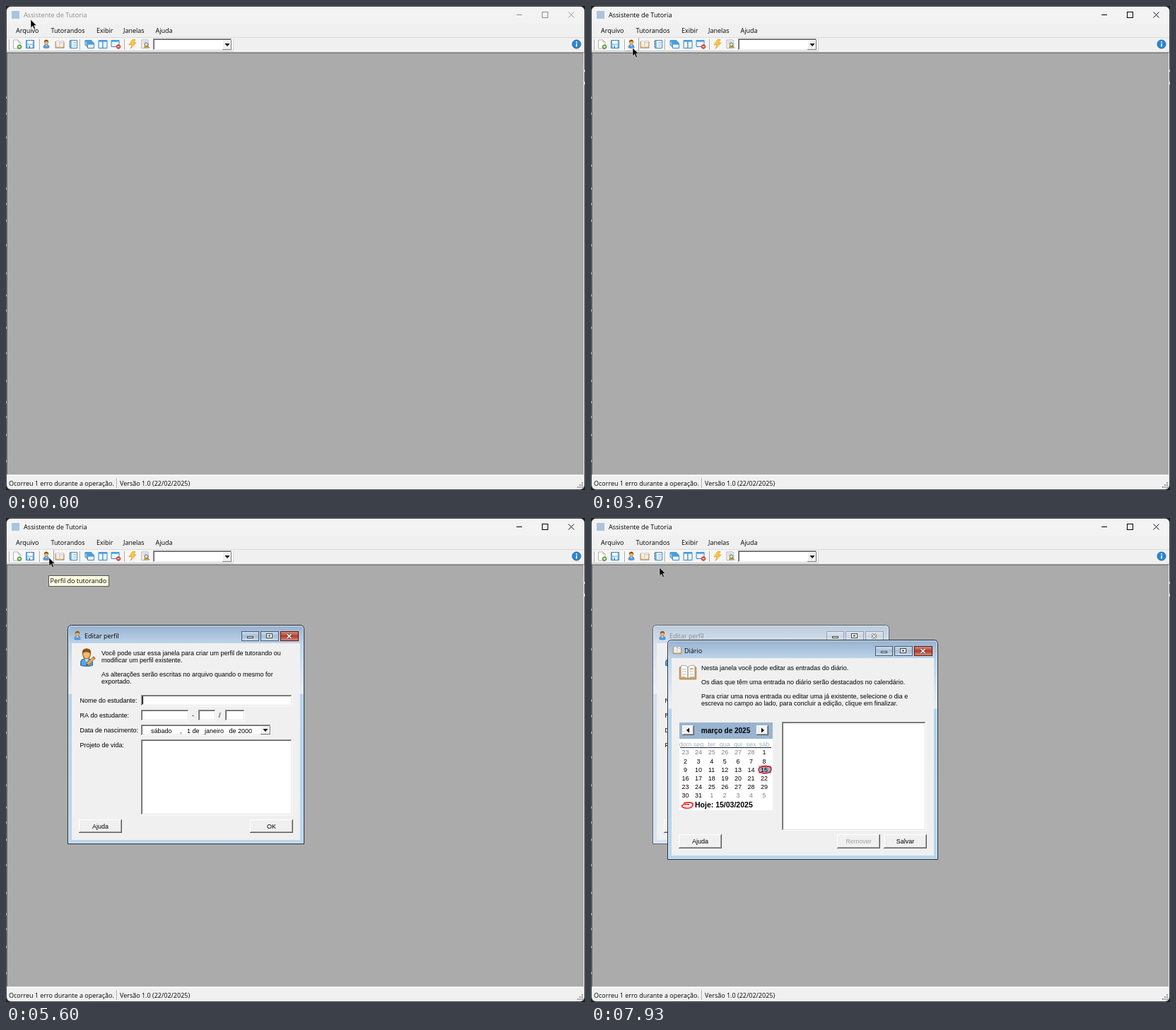
Recreate the animation shown at these times as an HTML page with a canvas. Size 819 by 684 pixels, loop 8000 ms.

```html
<!DOCTYPE html>
<html lang="pt-BR">
<head>
<meta charset="utf-8">
<style>
html, body { margin: 0; width: 100%; height: 100%; overflow: hidden; background: #222; }
canvas { display: block; }
</style>
</head>
<body>
<canvas id="stage" width="819" height="684"></canvas>
<script>
const g = document.getElementById('stage').getContext('2d');
const UI = '9px "Open Sans", sans-serif';
const TITLE = '9.2px "Open Sans", sans-serif';
const SANS = '9px "Liberation Sans", Arial, sans-serif';
const BOLD = 'bold 10px "Liberation Sans", Arial, sans-serif';
const FACE = '#f0f0f0', BLUE = '#3a86c0';

// ---- drawing helpers ----
function rect(color, x, y, w, h) {
  g.fillStyle = color;
  g.fillRect(x, y, w, h);
}
function outline(color, x, y, w, h) {
  g.strokeStyle = color;
  g.lineWidth = 1;
  g.strokeRect(x + .5, y + .5, w - 1, h - 1);
}
function rounded(color, x, y, w, h, radii) {
  g.fillStyle = color;
  g.beginPath();
  g.roundRect(x, y, w, h, radii);
  g.fill();
}
function path(d, fill, stroke, width = 1) {
  const p = new Path2D(d);
  if (fill) { g.fillStyle = fill; g.fill(p); }
  if (stroke) { g.strokeStyle = stroke; g.lineWidth = width; g.stroke(p); }
}
function text(s, x, y, font = SANS, color = '#000', align = 'left') {
  g.font = font;
  g.fillStyle = color;
  g.textAlign = align;
  g.fillText(s, x, y);
}
function bevel(x, y, w, h, topLeft, bottomRight, fill) {
  if (fill) rect(fill, x, y, w, h);
  rect(bottomRight, x, y + h - 1, w, 1);
  rect(bottomRight, x + w - 1, y, 1, h);
  rect(topLeft, x, y, w - 1, 1);
  rect(topLeft, x, y, 1, h - 1);
}
function field(x, y, w, h) {
  bevel(x, y, w, h, '#8c8c8c', '#fff', '#fff');
  bevel(x + 1, y + 1, w - 2, h - 2, '#696969', '#e3e3e3');
}
function button(label, x, y, w, h, color = '#000') {
  bevel(x, y, w, h, '#fff', '#5c5c5c', FACE);
  bevel(x + 1, y + 1, w - 2, h - 2, FACE, '#a0a0a0');
  text(label, x + w / 2, y + h / 2 + 3, SANS, color, 'center');
}
function arrow(x, y, d) {
  path(`M${x} ${y}${d}z`, '#000');
}
function at(x, y, scale, draw) {
  g.save();
  g.translate(x, y);
  g.scale(scale, scale);
  draw();
  g.restore();
}

// ---- icons, drawn around their centre ----
function person() {
  path('M-4.5 6V3.5Q-4 1 0 1Q4 1 4.5 3.5V6Q0 7.5-4.5 6z', '#5ba2dc', '#2b68a5', .6);
  path('M-1.5 1L0 3.5L1.5 1z', '#fff');
  path('M-3-3.5Q-3-6.5 0-6.5T3-3.5Q3 1 0 1.2Q-3 1-3-3.5z', '#f0b873', '#8d5a24', .6);
  path('M-3.2-2.5Q-4-6.8 0-6.8T3.2-2.5Q2-4.5-.5-4Q-2.5-4-3.2-2.5z', '#8a5218');
}
function book() {
  path('M-6.5-4H6.5V5.5H-6.5z', '#d9a860', '#a4763a', .5);
  path('M0-4Q-2.5-6.2-5.5-5V4Q-2.5 3 0 5Q2.5 3 5.5 4V-5Q2.5-6.2 0-4z', '#fffdf8', '#a59a88', .5);
  path('M0-4V5', null, '#9a958a', .8);
  path('M-4.3-2.5H-1.5M-4.3-.5H-1.5M-4.3 1.5H-1.5M1.5-.5H4.3M1.5 1.5H4.3', null, '#b4b4b4', .5);
  path('M1.5-2.7H4.3', null, '#d56342', .7);
}
function pencil() {
  path('M-5 5L-4 2L3-5L5-3L-2 4z', '#f5b041', '#8b5a17', .6);
  path('M2-4L3-5L5-3L4-2z', '#e0695a');
  path('M-5 5L-4.4 3.2L-3.1 4.4z', '#333');
}
function pane(x, y, w, h) {
  path(`M${x} ${y}h${w}v${h}h${-w}z`, '#eef7fd', BLUE, 1);
  rect('#4ea5e2', x, y, w, 2.2);
}
const toolIcons = [
  [15, () => {
    path('M-4.5-6H2L5-3V6H-4.5z', '#fff', '#a0a0a0', .8);
    path('M2-6V-3H5', '#ddd', '#a0a0a0', .6);
    path('M4 .7a3 3 0 1 0 .01 0z', '#56a727', '#397717', .5);
    path('M4 2V5.4M2.3 3.7H5.7', null, '#fff', 1);
  }],
  [34, () => {
    path('M-5.5-5.5H5.5V5.5H-5.5z', '#8cc3ec', '#3a80ba', 1);
    rect('#fff', -3.5, -5, 7, 4.5);
    rect('#f2f8fd', -3, 1, 6, 4);
    rect('#3a80ba', -1.5, 2.2, 1.5, 2.8);
  }],
  [57, () => at(0, -.3, .88, person)],
  [76, () => at(0, .2, .95, book)],
  [95, () => {
    path('M-4.5-5.5H5.5V5.5H-4.5z', '#f5fbff', BLUE, 1);
    rect('#8cc3ec', -4, -5, 2.3, 10);
    path('M-6-3.5h2.5M-6-.5h2.5M-6 2.5h2.5', null, '#777', .8);
    path('M0-2.5h4M0 0h4M0 2.5h4', null, '#7ca6c7', .8);
  }],
  [118, () => { pane(-6, -5.5, 9, 7); pane(-4, -3.5, 9, 7); pane(-2.5, -1.5, 9, 7); }],
  [137, () => { pane(-6, -5.5, 6, 11); pane(0, -5.5, 6, 11); }],
  [155, () => {
    pane(-6, -5.5, 11, 9);
    path('M4 .5a3 3 0 1 0 .01 0z', '#e0463c', '#a8271f', .5);
    path('M2.4 3.5H5.6', null, '#fff', 1.1);
  }],
  [179, () => path('M0-6.5H4L1.5-2H5L-3 6.5L-.8.7H-5z', '#ffc83a', '#d8922a', .7)],
  [197, () => {
    path('M-5-6H4V5.5H-5z', '#f7f7f7', '#a0a0a0', .8);
    path('M-3-3.5H2M-3-1.5H0', null, '#aaa', .7);
    rect('#d9a52b', -2, 2.5, 6, 2.5);
    path('M1.5-2a2.5 2.5 0 1 0 .01 0zM3.3 2.4L6 5.5', '#cfe6f6', '#555', 1);
  }]
];

// ---- main window ----
function mainWindow(active) {
  rect('#1c1c1c', 0, 0, 819, 684);
  rounded('#484848', 0, 0, 819, 684, 7);
  rounded(FACE, 1, 1, 817, 682, 6);
  rounded('#f3f3f3', 1, 1, 817, 24, [6, 6, 0, 0]);

  const ink = active ? '#000' : '#8d8d8d';
  rect('#a9c4dc', 8, 7, 11, 11);
  text('Assistente de Tutoria', 25, 16, TITLE, ink);
  rect(ink, 722, 12, 8, 1);
  outline(ink, 758, 8, 9, 9);
  path('M795.5 8.5L803.5 16.5M803.5 8.5L795.5 16.5', null, ink, .9);

  [['Arquivo', 14], ['Tutorandos', 63.5], ['Exibir', 128], ['Janelas', 166], ['Ajuda', 211.5]]
    .forEach(([label, x]) => text(label, x, 38, UI));

  rect('#dadada', 1, 44, 817, 1);
  rect('#f6f6f6', 1, 45, 321, 18);
  rect('#c4c4c4', 1, 63, 320, 1);
  rect('#d8d8d8', 321, 46, 1, 17);
  [4, 47, 104, 167].forEach(x => {
    rect('#aaa', x, 47, 1, 15);
    rect('#fff', x + 1, 47, 1, 15);
  });
  field(208, 46, 112, 17);
  bevel(306, 48, 13, 14, '#fff', '#777', FACE);
  arrow(309.5, 53, 'h7l-3.5 4');
  toolIcons.forEach(([x, draw]) => at(x, 54, 1, draw));
  path('M807 48a6 6 0 1 0 .01 0z', '#2a86d6', '#17599a', .8);
  rect('#fff', 806.2, 50.2, 1.8, 1.7);
  rect('#fff', 806.2, 53, 1.8, 4.5);

  rect('#a0a0a0', 1, 65, 817, 1);
  rect('#696969', 1, 66, 1, 596);
  rect('#ababab', 2, 66, 815, 596);
  rect('#7c7c7c', 2, 66, 815, 1);
  rect('#f6f6f6', 817, 66, 1, 596);
  rect('#e3e3e3', 1, 662, 817, 1);
  rect('#fff', 1, 663, 817, 1);
  rect('#555', 0, 66, 1, 596);
  for (let i = 0; i < 18; i++) rect('#ccc', 0, 128 + i * 30.3 + 8 * Math.sin(i * 5), 1, 3);
  rect('#ccc', 818, 90, 1, 3);
  rect('#ccc', 818, 107, 1, 4);

  text('Ocorreu 1 erro durante a operação.', 4, 677.5, UI);
  rect('#aaa', 156, 667, 1, 14);
  rect('#fff', 157, 667, 1, 14);
  text('Versão 1.0 (22/02/2025)', 161, 677.5, UI);
  for (let row = 0; row < 3; row++)
    for (let col = 0; col <= row; col++) rect('#999', 814 - col * 3, 673 + row * 3, 2, 2);
}

// ---- child windows ----
function childWindow(x, y, w, h, title, icon, active) {
  const fill = g.createLinearGradient(0, y, 0, y + h);
  const stops = active
    ? [[0, '#96b0cd'], [26, '#bcd3ea'], [97, '#e6eff8'], [98, '#b3d3ec'], [h, '#b9d6ee']]
    : [[0, '#bccbdc'], [26, '#d5e0ec'], [97, '#edf2f8'], [98, '#d3dfeb'], [h, '#d7e4f2']];
  stops.forEach(([dy, color]) => fill.addColorStop(dy / h, color));
  rounded(fill, x + .5, y + .5, w - 1, h - 1, [5, 5, 0, 0]);
  g.strokeStyle = active ? '#1f2c38' : '#56616c';
  g.lineWidth = 1;
  g.stroke();
  g.beginPath();
  g.roundRect(x + 1.5, y + 1.5, w - 3, h - 3, [4, 4, 0, 0]);
  g.strokeStyle = 'rgba(255,255,255,.55)';
  g.stroke();

  at(x + 14, y + 15, .9, icon);
  text(title, x + 24, y + 19, UI, active ? '#000' : '#888');

  const right = x + w, top = y + 9, line = active ? '#4c5d70' : '#98a3af';
  [[89, 25], [62, 26], [34, 26]].forEach(([offset, width], i) => {
    const bx = right - offset, close = i === 2 && active;
    const shade = g.createLinearGradient(0, top, 0, top + 14);
    const [a, b] = close ? ['#dd9a8c', '#b43a25'] : active ? ['#d3e1ef', '#a5bed8'] : ['#e2e9f1', '#ccd7e3'];
    shade.addColorStop(0, a);
    shade.addColorStop(.5, b);
    shade.addColorStop(1, a);
    rect(shade, bx, top, width, 14);
    outline(close ? '#5a1b14' : line, bx, top, width, 14);
    const cx = bx + 12.5, cy = top + 7;
    if (i === 0) {
      rect('#444', cx - 4.5, cy, 9, 3);
      rect('#fff', cx - 3.5, cy + 1, 7, 1);
    } else if (i === 1) {
      rect('#444', cx - 4.5, cy - 4, 9, 7);
      rect('#fff', cx - 3.5, cy - 3, 7, 5);
      rect('#444', cx - 1.5, cy - 1.5, 3, 2);
    } else {
      const cross = `M${cx - 3} ${cy - 3}l6 6m0-6l-6 6`;
      path(cross, null, '#444', 3);
      path(cross, null, '#fff', 1.6);
    }
  });
  rect(FACE, x + 6, y + 26, w - 12, h - 32);
}

function profileWindow(active, caret) {
  childWindow(87, 151, 335, 310, 'Editar perfil', person, active);
  at(114, 197, 1.85, person);
  at(120, 202, 1.25, pencil);
  [
    ['Você pode usar essa janela para criar um perfil de tutorando ou', 135, 193.5],
    ['modificar um perfil existente.', 135, 204],
    ['As alterações serão escritas no arquivo quando o mesmo for', 135, 223.5],
    ['exportado.', 135, 234],
    ['Nome do estudante:', 104.5, 261],
    ['RA do estudante:', 104.5, 282],
    ['Data de nascimento:', 104.5, 303],
    ['Projeto de vida:', 104.5, 324],
    ['-', 263, 282],
    ['/', 301, 282]
  ].forEach(line => text(...line));
  field(191, 250, 214, 16);
  field(191, 271, 68, 16);
  field(272, 271, 25, 16);
  field(310, 271, 28, 16);
  field(191, 292, 184, 16);
  [['sábado', 205], [',', 246], ['1 de', 256], ['janeiro', 281], ['de 2000', 315.5]]
    .forEach(([s, x]) => text(s, x, 303.5));
  bevel(360, 294, 14, 12, '#fff', '#777', FACE);
  arrow(363.5, 298, 'h7l-3.5 4');
  field(191, 313, 214, 107);
  button('Ajuda', 103, 426, 61, 19);
  button('OK', 345, 426, 61, 19);
  if (caret) rect('#000', 193, 252, 1, 11);
}

function calendar() {
  rect('#fff', 125, 289, 132, 124);
  rect('#99b4d1', 125, 289, 132, 23);
  button('', 129, 293, 17, 14);
  button('', 234, 293, 17, 14);
  arrow(139, 296.5, 'v7l-4-3.5');
  arrow(241, 296.5, 'v7l4-3.5');
  text('março de 2025', 190.5, 304, BOLD, '#000', 'center');
  const column = i => 133.5 + i * 18.6;
  'dom seg ter qua qui sex sáb'.split(' ')
    .forEach((day, i) => text(day, column(i), 323, SANS, '#99b4d1', 'center'));
  rect('#222', 126, 324, 129, 1);
  rect('#99b4d1', 237, 350, 18, 11);
  for (let i = 0; i < 42; i++) {
    const date = new Date(2025, 1, 23 + i);
    const color = date.getMonth() === 2 ? '#000' : '#808080';
    text(date.getDate(), column(i % 7), 334.3 + Math.floor(i / 7) * 12.2, SANS, color, 'center');
  }
  path('M241 351Q256 349 255 356Q253 361 245 361Q236 360 237 355Q239 350 251 351', null, '#f00', 1.4);
  path('M131 403Q145 400 144 406Q142 411 134 410Q127 409 129 406Q132 404 139 405', null, '#f00', 1.4);
  text('Hoje: 15/03/2025', 147, 409, BOLD.replace('10', '10.5'));
}

function diaryWindow() {
  childWindow(108, 172, 383, 311, 'Diário', book, true);
  at(137, 218, 1.8, book);
  [
    ['Nesta janela você pode editar as entradas do diário.', 214.5],
    ['Os dias que têm uma entrada no diário serão destacados no calendário.', 234.5],
    ['Para criar uma nova entrada ou editar uma já existente, selecione o dia e', 255],
    ['escreva no campo ao lado, para concluir a edição, clique em finalizar.', 265]
  ].forEach(([s, y]) => text(s, 156, y));
  calendar();
  field(270, 288, 204, 154);
  button('Ajuda', 124, 447, 61, 20);
  button('Remover', 348, 447, 61, 20, '#a0a0a0');
  button('Salvar', 414, 447, 61, 20);
}

function tooltip(label, x, y, w) {
  rect('#ffffe1', x, y, w, 16);
  outline('#555', x, y, w, 16);
  text(label, x + 2.5, y + 11.3, UI);
}

// ---- timeline: 15 ticks per second, 120 ticks per loop ----
const route = [
  [0, 35, 19], [3, 222, 66], [11, 222, 66], [15, 332, 330], [20, 332, 330], [22, 318, 340],
  [27, 152, 92], [29, 152, 92], [31, 137, 85], [36, 95, 61], [39, 95, 61], [40, 95, 60],
  [48, 95, 60], [51, 59, 59], [55, 59, 59], [63, 76, 59], [69, 76, 59], [70, 75, 60],
  [76, 61, 56], [87, 61, 56], [93, 78, 60], [99, 78, 60], [105, 81, 63], [116, 81, 63],
  [119, 97, 70]
];
function pointer(tick) {
  const i = Math.max(1, route.findIndex(k => k[0] >= tick));
  const [t0, x0, y0] = route[i - 1], [t1, x1, y1] = route[i];
  const p = (tick - t0) / (t1 - t0);
  return [Math.round(x0 + (x1 - x0) * p), Math.round(y0 + (y1 - y0) * p)];
}

function render(ms) {
  const tick = Math.min(119, Math.floor(ms % 8000 * .015 + .05));
  const during = (from, to) => tick >= from && tick < to;
  const [x, y] = pointer(tick);
  mainWindow(tick >= 55);

  if (y >= 45 && y < 64) {
    const left = [49, 67, 86].find(b => x >= b && x < b + 19);
    const pressed = during(81, 84) || tick === 115;
    if (left) bevel(left, 45, 19, 19, pressed ? '#a0a0a0' : '#fff', pressed ? '#fff' : '#a0a0a0');
  }
  const diary = tick >= 117;
  if (tick >= 84) profileWindow(!diary, Math.floor((tick - 84) / 8) % 2 === 0);
  if (diary) diaryWindow();

  if (during(66, 71)) tooltip('Abrir diário', 76, 84, 53);
  if (during(80, 89)) tooltip('Perfil do tutorando', 60, 81, 86);
  if (during(109, 117)) tooltip('Abrir diário', 80, 87, 53);

  at(x - .5, y - .3, 1, () => path('M.5.5V12L3.2 9.5L5.2 14L7 13.2L5.1 8.8H8.6z', '#000', 'rgba(255,255,255,.7)', .7));
}

function loop(now) {
  render(now);
  requestAnimationFrame(loop);
}
render(0);
requestAnimationFrame(loop);
</script>
</body>
</html>
```
